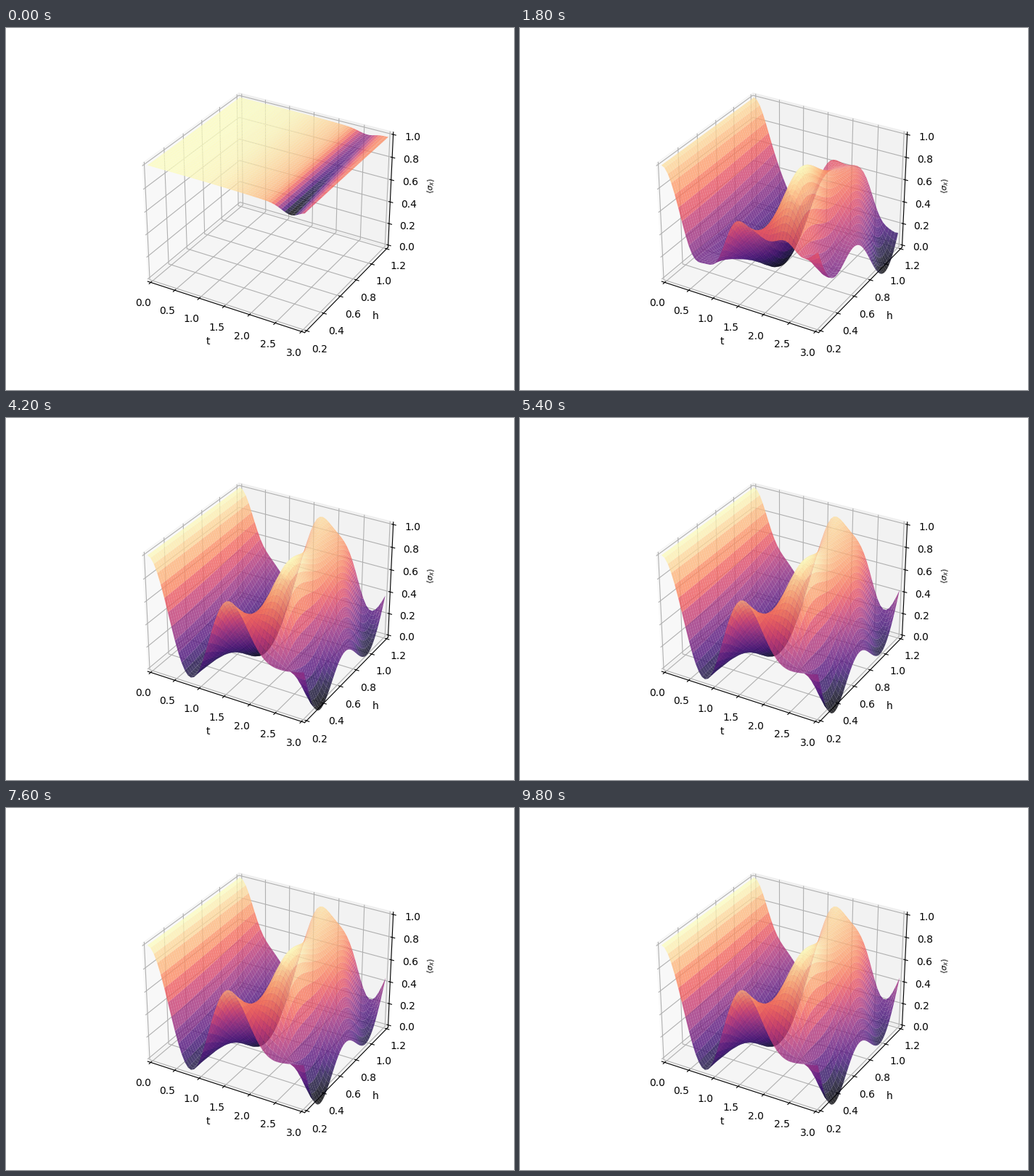
A matplotlib script for the animation above (10000 ms loop, 700 by 500 pixels).

```python
import numpy as np
import matplotlib.pyplot as plt
from matplotlib.animation import FuncAnimation

FRAMES, STEP_MS = 50, 200
SPAN_T, SPAN_H, SPAN_Z = (0, 3), (0.2, 1.2), (0, 1)

T, H = np.meshgrid(np.linspace(*SPAN_T, 50), np.linspace(*SPAN_H, 50))


def ring_magnetisation(t, h):
    """Transverse magnetisation of a four-spin Ising ring started along x."""
    total = 0
    for k in (np.pi / 4, 3 * np.pi / 4):
        eps = 2 * np.sqrt(1 + h**2 - 2 * h * np.cos(k))
        mix = (2 * np.sin(k) / eps) ** 2
        total = total + 1 - mix + mix * np.cos(2 * eps * t)
    return total / 2


def first_guess(t, h):
    """Almost flat sheet with one narrow trough late in time."""
    u = h - 0.2
    off = t - (2.75 - 0.15 * u)
    width = np.where(off < 0, 0.24, 0.19)
    trough = (0.058 - 0.03 * u) * np.exp(-((off / width) ** 2))
    sag = 0.018 / (1 + np.exp(-2.5 * (t - 2.1)))
    return 1 - trough - sag


def bump(height, t0, h0, wt, wh):
    return height * np.exp(-(((T - t0) / wt) ** 2) - ((H - h0) / wh) ** 2)


def smooth(x):
    x = np.clip(x, 0, 1)
    return x * x * (3 - 2 * x)


EXACT = ring_magnetisation(T, H)
START = first_guess(T, H)
PLATEAU = 0.42 + 0.58 * np.exp(-((T / 0.6) ** 2))

# Fit errors, grouped by how fast they fade; all vanish at t = 0
RISE = 1 - np.exp(-((T / 0.3) ** 2))
SLOW_ERR = RISE * (
    bump(0.24, 0.8, 0.2, 0.25, 0.3)
    + bump(-0.12, 1.65, 0.2, 0.25, 0.25)
    + bump(0.33, 2.4, 0.2, 0.35, 0.3)
    + bump(0.42, 3.05, 0.4, 0.3, 0.3)
    + bump(0.12, 1.6, 0.55, 0.35, 0.2)
)
PEAK_ERR = RISE * (
    bump(-0.3, 1.7, 1.2, 0.5, 0.45) + bump(-0.17, 0.8, 1.2, 0.3, 0.3)
)
CORNER_ERR = bump(-0.38, 3.1, 1.2, 0.25, 0.22)


def surface(n):
    late = max(n - 9, 0)
    fit = (
        EXACT
        + SLOW_ERR * np.exp(-late / 5)
        + PEAK_ERR * np.exp(-late / 2.5)
        + CORNER_ERR * np.exp(-((late / 9) ** 1.4))
    )
    early, mid = smooth(n / 4), smooth((n - 2) / 7)
    rough = START + (PLATEAU - START) * early
    return rough + (fit - rough) * mid


def padded(span):
    pad = (span[1] - span[0]) / 48
    return span[0] - pad, span[1] + pad


fig = plt.figure(figsize=(7, 5), dpi=100)
ax = fig.add_subplot(projection="3d")
ax.set_xlim(*padded(SPAN_T))
ax.set_ylim(*padded(SPAN_H))
ax.set_zlim(*padded(SPAN_Z))
ax.set_xticks(np.linspace(*SPAN_T, 7))
ax.set_yticks(np.linspace(*SPAN_H, 6))
ax.set_zticks(np.linspace(*SPAN_Z, 6))
ax.set_xlabel("t")
ax.set_ylabel("h")
ax.set_zlabel(r"$\langle \sigma_x \rangle$", fontsize=8)


def draw(n):
    for old in list(ax.collections):
        old.remove()
    sheet = ax.plot_surface(T, H, surface(n), cmap="magma",
                            linewidth=0, alpha=0.8)
    return (sheet,)


anim = FuncAnimation(fig, draw, frames=FRAMES, interval=STEP_MS,
                     init_func=lambda: draw(0), repeat=True, repeat_delay=0)
plt.show()
```
